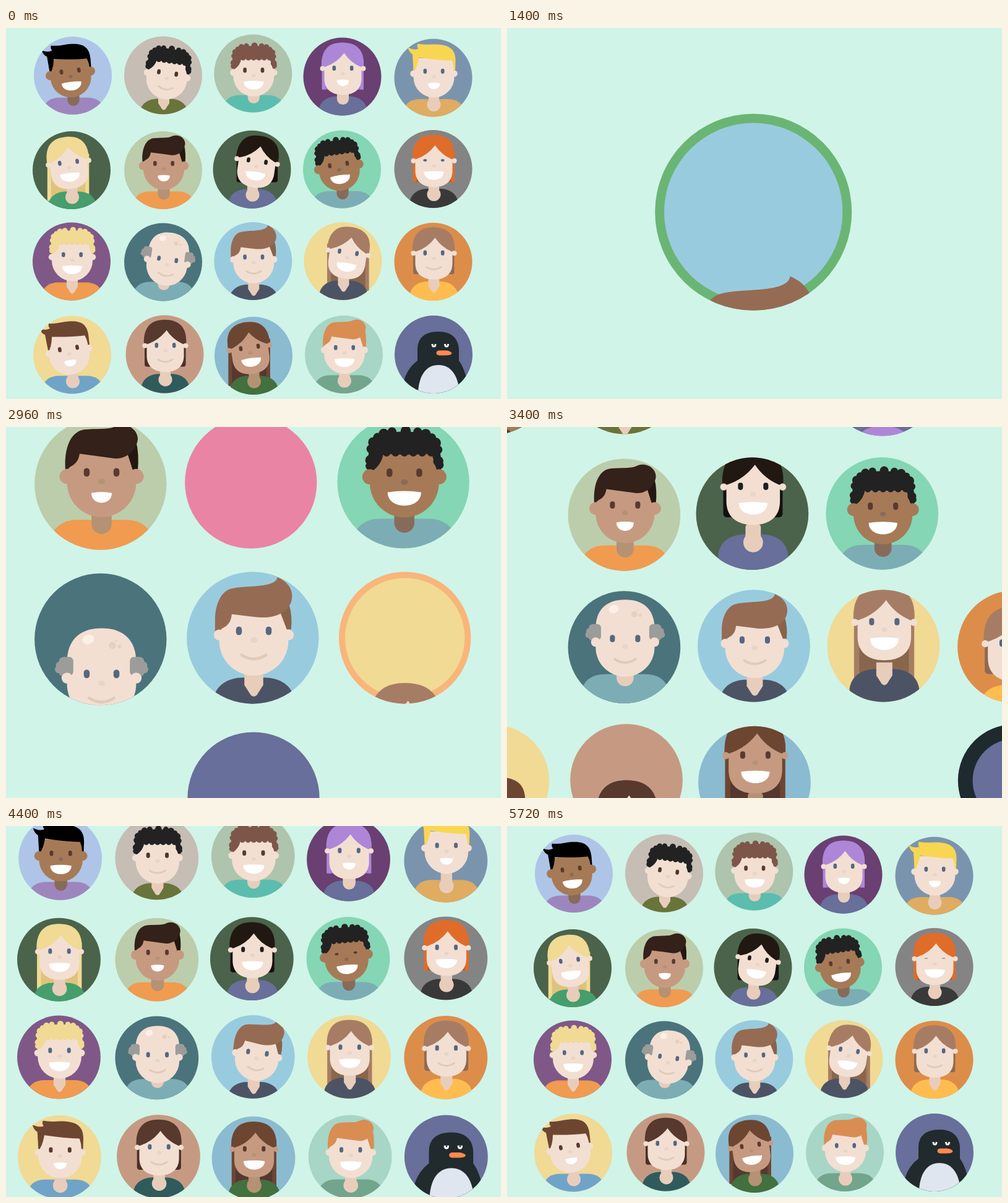
An HTML page for the animation above (5760 ms loop, 800x600 px).

```html
<!DOCTYPE html>
<html lang="en">
<head>
<meta charset="utf-8">
<title>Avatars</title>
<style>
html, body { margin: 0; width: 100%; height: 100%; overflow: hidden; background: #d0f4e8; }
svg { display: block; width: 100vw; height: 100vh; }
</style>
</head>
<body>
<svg viewBox="0 0 800 600">
  <defs><clipPath id="disc"><circle r="63"/></clipPath></defs>
  <g id="world"></g>
</svg>
<script>
const LOOP = 5760, INTRO = 1240, R = 63, PIVOT_Y = 429;

const SKINS = {
  light: { face: '#f2dfd2', neck: '#e8cdbb', nose: '#e8d5c7', ear: 5.2 },
  tan: { face: '#c69a80', neck: '#b59273', nose: '#b59273', ear: 7.2 },
  brown: { face: '#a67a56', neck: '#876b5a', nose: '#876b5a', ear: 7.2 }
};
const BLUE = '#566781', BROWN = '#593a30';
const RINGS = ['#6ab574', '#f9b57a', '#e984a5', '#676f9a', '#1f2a2e'];

// x, y, disc, shirt, hair, style, skin, eyes, mouth, neck, wide, shirt top, head dy, start
const PEOPLE = [
  [108, 77, '#aec5e8', '#9d86bd', '#000000', 'spike', 'brown', BROWN, 'big', 'u', 1, 35.5, -1, 3200],
  [254, 76.5, '#c6bdb4', '#69743a', '#222222', 'curl', 'light', '#4f342c', 'line', 'v', 0, 38, 2.5, 3080],
  [399.3, 73.5, '#aec4ac', '#5bbdae', '#7d5649', 'curl', 'light', BROWN, 'big', 'u', 1, 35, 1.3, 3560],
  [543.5, 78.6, '#6a3f71', '#676f9a', '#ae86d8', 'bob', 'light', BLUE, 'small', 'u', 0, 32, -7, 3250],
  [690.5, 80.5, '#7b94ae', '#dfac62', '#f8d652', 'spike', 'light', BLUE, 'small', 'o', 1, 34.5, -4, 3800],
  [106, 230, '#4b634a', '#469e6c', '#f0da94', 'long', 'light', BLUE, 'big', 'o', 0, 34.5, -6.5, 3410],
  [254, 230, '#bccdab', '#f09b50', '#33211a', 'quiff', 'tan', BROWN, 'small', 'u', 1, 34.3, -4.3, 1755],
  [397.5, 228.7, '#4b634a', '#676f9a', '#221812', 'bob', 'light', '#1f1f1f', 'big', 'o', 0, 32, -7.3, 2865],
  [543, 228.5, '#85d6b4', '#7cadb5', '#222222', 'curl', 'brown', BROWN, 'big', 'u', 1, 35.2, -1.5, 2220],
  [690.5, 228, '#848484', '#393939', '#e06c2a', 'bob', 'light', BLUE, 'big', 'o', 0, 32, -7.3, 3680],
  [106, 377.5, '#7f5888', '#f09b50', '#f0da94', 'curl', 'light', BLUE, 'big', 'v', 1, 34, -4.3, 3560],
  [254, 378.5, '#4b737c', '#7cadb5', '#9c9c9a', 'bald', 'light', BLUE, 'line', 'u', 1, 32, 2, 2710],
  [399.3, 377, '#99cbde', '#4c5365', '#966b53', 'sweep', 'light', BLUE, 'line', 'v', 0, 38, 0, 1240],
  [544.5, 377, '#f0da94', '#4c5365', '#a67d64', 'long', 'light', BLUE, 'big', 'v', 0, 31.5, -8, 2800],
  [690.5, 378, '#dd8d4a', '#ffbd50', '#a67d64', 'bob', 'light', BLUE, 'line', 'v', 0, 32, -7.7, 3090],
  [107, 528.5, '#f0da94', '#70a3c8', '#6d4632', 'spike', 'light', BROWN, 'small', 'o', 1, 34, -4, 3170],
  [256.5, 527.5, '#c69a82', '#305b5c', '#57392e', 'bob', 'light', BLUE, 'line', 'o', 0, 32, -7.7, 3180],
  [400, 530, '#8bbbd0', '#42703f', '#6d4632', 'long', 'tan', BROWN, 'big', 'o', 0, 32.5, -7.3, 2865],
  [546, 528, '#a7d5c6', '#73a58c', '#d98d52', 'quiff', 'light', BLUE, 'big', 'o', 1, 33.6, -4.5, 3560],
  [691, 528, '#676f9a', '', '', 'bird', 'light', '', '', '', 0, 0, 0, 3260]
];
const RING_OF = { 4: '#74bc79', 7: '#e984a5', 9: '#1f2a2e', 12: '#6ab574', 13: '#f9b57a', 17: '#676f9a' };
const BACK = { 3: '#9d77c9', 5: '#dfc27c', 7: '#15100d', 9: '#c2531d', 13: '#88664b', 14: '#8f6a53', 16: '#4a3027', 17: '#55382e' };

// index: [degrees, tilt start, return start]
const TILTS = {
  0: [-6.5, 5180, 6160], 1: [8, 5240, 6260], 5: [-6.5, 4980, 6340], 7: [8, 5100, 6200],
  8: [-8, 4250, 6300], 11: [8, 5040, 6400], 12: [7, 3450, 5000], 13: [8, 5000, 6240],
  15: [-8, 5140, 6120], 17: [-8, 5060, 6280],
  2: [-7, 6460, 6740], 4: [8, 6480, 6740], 9: [7, 6440, 6740], 10: [-8, 6460, 6740]
};
const BLINKS = { 6: 3800, 8: 4440, 9: 5715 };

// log of the zoom over time
const ZOOM = [[1240, .93], [1400, .926], [2080, .834], [2960, .527], [3840, .2135], [4400, .0677], [4840, .011], [5300, 0], [7100, 0]];

const path = (d, fill) => `<path d="${d}" fill="${fill}"/>`;
const dot = (x, y, r, fill) => `<circle cx="${x}" cy="${y}" r="${r}" fill="${fill}"/>`;
const oval = (x, y, rx, ry, fill) => `<ellipse cx="${x}" cy="${y}" rx="${rx}" ry="${ry}" fill="${fill}"/>`;
const box = (x, y, w, h, r, fill) => `<rect x="${x}" y="${y}" width="${w}" height="${h}" rx="${r}" fill="${fill}"/>`;

function curls(color) {
  let s = path('M-34 -9C-36 -34 -32 -46 0 -46C32 -46 36 -34 35 -9L31 -9L26 -25Q4 -23 -20 -25Q-22 -14 -31 -8Z', color);
  const bend = v => Math.sign(v) * Math.abs(v) ** .75;
  for (let a = 176, k = 0; a <= 366; a += 15.8, k++) {
    const t = a * Math.PI / 180;
    s += dot(32.5 * bend(Math.cos(t)), -22 + 24.5 * bend(Math.sin(t)), k % 2 ? 4.2 : 4.9, color);
  }
  for (let x = -17; x <= 26; x += 8.5) s += dot(x, -26, 3.8, color);
  return s + dot(-33, -13, 4, color) + dot(33.5, -14, 4, color);
}

function tuft(side, color) {
  let s = box(side < 0 ? -40 : 27, -23, 13, 18, 4, color);
  for (const [x, y] of [[37, -19], [40, -15], [41, -11], [37, -8]]) s += dot(side * x, y, 3.6, color);
  return s;
}

const HAIR = {
  sweep: c => path('M25 -25L31.5 -8H35.6Q37 -22 33.5 -32Z', '#876349') +
    path('M-37 -6V-17C-37 -32 -31 -45 -21 -47C-8 -50.5 21 -47 22.5 -58C32 -54 36.5 -47 36.5 -40C36.5 -26 22 -17 0 -20L-21 -22.5C-22 -14 -25 -11.5 -31 -8.5V-6Z', c),
  quiff: c => path('M24 -27L30 -8H34.5Q36 -24 33 -36Z', c === '#33211a' ? '#241710' : c) +
    path('M-34.5 -8C-36 -27 -31 -45 -17 -47.5C-4 -49 7 -47 14 -51C25 -55 35 -47 34.5 -38C33 -27 23 -19.5 13 -20L-21 -24.5C-22 -17 -26 -14 -30 -12Z', c),
  spike: c => path('M-33 -8L-34.5 -34Q-40 -37 -42 -45Q-32 -40 -25 -43Q-28 -46 -26 -51Q-16 -49 -5 -50C22 -51 35 -45 35 -24L34.5 -8H32Q32 -17 29 -24Q8 -24 -24 -29Q-26 -16 -31 -8Z', c),
  curl: curls,
  part: c => path('M-34.5 -7C-36 -34 -25 -48 -1 -48C24 -48 36 -34 33.5 -7L28 -9Q12 -16 2 -31Q-10 -15 -28 -9Z', c),
  bald: c => tuft(-1, c) + tuft(1, c)
};

const MOUTH = {
  big: path('M-16 12Q0 9.5 16 12C16 20 9 24.8 0 24.8S-16 20 -16 12Z', '#fff'),
  small: path('M-9.8 13Q0 11 9.8 13C9.8 19 5 22.3 0 22.3S-9.8 19 -9.8 13Z', '#fff'),
  line: '<path d="M-11.8 16.3Q0 24 11.8 16.3" fill="none" stroke="#dfcabb" stroke-width="2.7" stroke-linecap="round"/>'
};

function neck(kind, top, c) {
  if (kind === 'v') return path(`M-9 24V${top + 7}L-3 ${top + 16.5}Q0 ${top + 19.5} 3 ${top + 16.5}L9 ${top + 7}V24Z`, c);
  if (kind === 'u') return box(-9.6, 18, 19.2, top - 4.5, 9.6, c);
  return box(-8.6, 20, 17.2, 24, 4, c) + dot(0, top + 9, 11, c);
}

function person(i, [, , , shirt, hair, style, tone, eye, mouth, collar, wide, top, dy]) {
  const girl = style === 'bob' || style === 'long', skin = SKINS[tone];
  const earX = 33, earY = girl ? -6 : -2.8, earR = girl ? 4 : skin.ear;
  let back = '', face;
  if (girl) {
    const len = style === 'long' ? 76 : 48, strands = style === 'long' || i === 3 || i === 9;
    back = box(-33.5, -20, 66.5, len, style === 'long' ? 0 : 4, BACK[i]);
    if (strands) back += box(-34, -20, 6, len, 0, hair) + box(27.5, -20, 6, len, 0, hair);
    face = path('M-30 -30V10C-30 28 -18 36.5 0 36.5S30 28 30 10V-30Q0 -44 -30 -30Z', skin.face);
  } else if (style === 'bald') {
    face = path('M-33 3V-18C-33 -40 -20 -50.4 0 -50.4S33 -40 33 -18V3A33 33 0 0 1 -33 3Z', skin.face) +
      '<ellipse rx="5.7" ry="4.6" transform="translate(-12.7 -39.7) rotate(-20)" fill="#fcefe7"/>' +
      dot(10.3, -34, 3.5, '#e8d0c0') + dot(17, -33, 1.8, '#e8d0c0') + dot(14, -38.5, 1, '#e8d0c0');
  } else {
    face = path('M-33 3V-28H31L33 -8V3A33 33 0 0 1 -33 3Z', skin.face);
  }
  const eyes = [-14.2, 14.2].map(x =>
    `<g transform="translate(${x} -6.7)"><rect class="eye" x="-2.8" y="-4.1" width="5.6" height="8.2" rx="2.8" fill="${eye}"/></g>`).join('');
  const ears = dot(-earX, earY, earR, skin.face) + dot(earX, earY, earR, skin.face);
  const locks = HAIR[girl ? 'part' : style](hair);
  const body = wide
    ? `M-50 70V${top + 22}Q-46 ${top} -22 ${top}H22Q46 ${top} 50 ${top + 22}V70Z`
    : `M-39 70V${top + 22}C-37 ${top + 7} -24 ${top} -10 ${top}H10C24 ${top} 37 ${top + 7} 39 ${top + 22}V70Z`;
  return `<g class="back"><g transform="translate(0 ${dy})">${back}</g></g>` +
    path(body, shirt) + box(-50, 69, 100, 60, 0, shirt) + neck(collar, top, skin.neck) +
    `<g class="head"><g transform="translate(0 ${dy})">${face}${locks}${ears}` +
    `${eyes}${oval(0, 2.2, 3.3, 2.7, skin.nose)}${MOUTH[mouth]}</g></g>`;
}

function bird() {
  const ink = '#212a2d';
  const eye = x => path(`M${x - 4} -17H${x + 4}Q${x + 4} -11.5 ${x} -11.5T${x - 4} -17Z`, '#fff') + box(x - 1, -17, 2.2, 2.4, .8, ink);
  return path('M-27 -8C-27 -27 -15 -37 7 -37S40 -25 40 -6V10C46 18 52 32 54 50V130H-50V46C-46 30 -38 18 -27 10Z', ink) +
    path('M-26 130V60C-24 32 -12 17 7 17S38 32 41 60V130Z', '#dfe6f0') +
    `<g class="head">${eye(-.5)}${eye(20)}</g>` +
    path('M8 -6.5H20Q28 -5 28.5 -2Q28 1.5 18 1.5H8Q3.5 1 3.5 -2.5T8 -6.5Z', '#ff8a50');
}

const world = document.getElementById('world');
world.innerHTML = PEOPLE.map((p, i) =>
  `<g transform="translate(${p[0]} ${p[1]})"><circle class="first" fill="${RING_OF[i] || RINGS[i % 5]}"/>` +
  `<circle class="disc" fill="${p[2]}"/><g clip-path="url(#disc)"><g class="body">${i === 19 ? bird() : person(i, p)}</g></g></g>`).join('');

const parts = [...world.children].map(g => ({
  first: g.querySelector('.first'), disc: g.querySelector('.disc'), body: g.querySelector('.body'),
  head: g.querySelector('.head'), back: g.querySelector('.back'), eyes: g.querySelectorAll('.eye')
}));

const clamp = x => Math.max(0, Math.min(1, x));
const smooth = x => { x = clamp(x); return x * x * (3 - 2 * x); };
const cubicOut = x => 1 - (1 - clamp(x)) ** 3;
const cubicInOut = x => { x = clamp(x); return x < .5 ? 4 * x ** 3 : 1 - 4 * (1 - x) ** 3; };

// smooth curve through unevenly spaced points
function curve(keys, t) {
  let i = 0;
  while (i < keys.length - 2 && t >= keys[i + 1][0]) i++;
  const slope = k => k <= 0 || k >= keys.length - 2 ? 0
    : (keys[k + 1][1] - keys[k - 1][1]) / (keys[k + 1][0] - keys[k - 1][0]);
  const [t0, a] = keys[i], [t1, b] = keys[i + 1], h = t1 - t0, u = (t - t0) / h;
  return a + (b - a) * u * u * (3 - 2 * u) + h * u * (1 - u) * (slope(i) * (1 - u) - slope(i + 1) * u);
}

function pose(part, i, t) {
  const p = t - PEOPLE[i][13];
  const grow = cubicInOut(p / 100), fill = cubicOut((p - 102) / 108), rise = p - 140;
  part.first.setAttribute('r', fill < 1 ? R * grow : 0);
  part.first.setAttribute('cy', 18 * (1 - grow));
  part.disc.setAttribute('r', R * fill);
  part.body.setAttribute('visibility', rise > 0 ? 'visible' : 'hidden');
  if (rise <= 0) return;

  const y = 115 * Math.exp(-.0065 * rise) * Math.cos(.00748 * rise);
  part.body.setAttribute('transform', `translate(1 ${y})`);

  const lift = -8 * Math.sin(Math.PI * clamp((rise - 160) / 450)) * (i === 19 ? .4 : 1);
  const [deg, on, off] = TILTS[i] || [0, 0, 0];
  const tilt = deg * (smooth((t - on) / 260) - smooth((t - off) / 260));
  part.head.setAttribute('transform', `translate(0 ${lift}) rotate(${tilt} 0 40)`);
  if (part.back) part.back.setAttribute('transform', `translate(${tilt * .95} ${lift})`);

  const mid = BLINKS[i] || 5900 + (i * 7 % 13) * 80;
  const open = 1 - .9 * clamp(1 - Math.abs(t - mid) / 110);
  part.eyes.forEach(e => e.setAttribute('transform', `scale(1 ${open})`));
}

function frame() {
  let t = performance.now() % LOOP;
  if (t < INTRO) t += LOOP;
  const s = Math.exp(curve(ZOOM, t));
  world.setAttribute('transform', `translate(400 ${PIVOT_Y}) scale(${s}) translate(-400 ${-PIVOT_Y})`);
  parts.forEach((part, i) => pose(part, i, t));
  requestAnimationFrame(frame);
}
frame();
</script>
</body>
</html>
```
